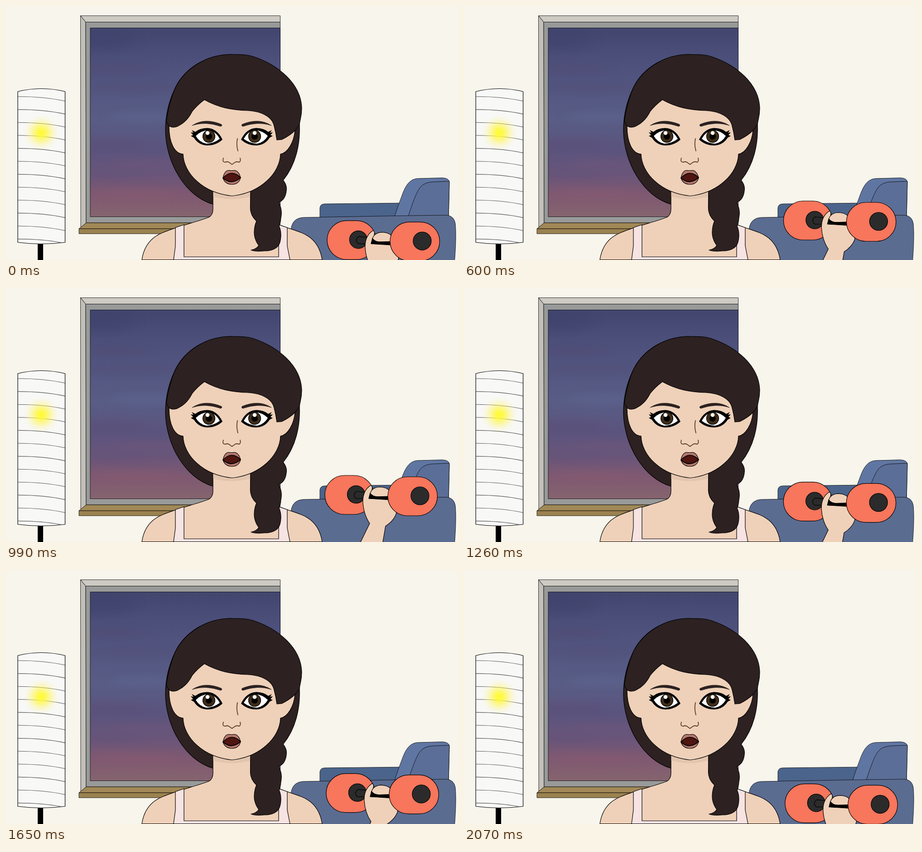
An HTML page that plays this animation: 998 by 561 pixels, repeating every 2100 ms.

```html
<!DOCTYPE html>
<html lang="en">
<head>
<meta charset="utf-8">
<title>Evening workout</title>
<style>
html, body { margin: 0; height: 100%; overflow: hidden; background: #f7f5ec; }
svg { display: block; width: 100vw; height: 100vh; }
.line { stroke: #000; stroke-width: 1.2; stroke-linejoin: round; }
.thin { stroke: #000; stroke-width: .8; stroke-linejoin: round; }
.skin { fill: #efd1b9; }
.hair { fill: #2d2121; }
</style>
</head>
<body>
<svg viewBox="0 0 998 561">
  <defs>
    <linearGradient id="sky" x1="0" y1="0" x2="0" y2="1">
      <stop offset="0" stop-color="#42466f"/>
      <stop offset=".2" stop-color="#4e517c"/>
      <stop offset=".48" stop-color="#595d86"/>
      <stop offset=".64" stop-color="#5a547e"/>
      <stop offset=".78" stop-color="#6a5579"/>
      <stop offset=".89" stop-color="#7f5971"/>
      <stop offset="1" stop-color="#86646e"/>
    </linearGradient>
    <radialGradient id="glow">
      <stop offset="0" stop-color="#fffb30"/>
      <stop offset=".2" stop-color="#fffa3c" stop-opacity=".9"/>
      <stop offset=".5" stop-color="#fff650" stop-opacity=".5"/>
      <stop offset=".75" stop-color="#fff36a" stop-opacity=".18"/>
      <stop offset="1" stop-color="#fff36a" stop-opacity="0"/>
    </radialGradient>
    <filter id="soft" x="-50%" y="-100%" width="200%" height="300%"><feGaussianBlur stdDeviation="16 7"/></filter>
    <clipPath id="glass"><rect x="186" y="48.500" width="419" height="417"/></clipPath>
  </defs>

  <!-- window -->
  <g class="thin">
    <path fill="#cdcac3" d="M164.500 21.500H605.500V35.500H176Z"/>
    <path fill="#c2bfb9" d="M164.500 21.500L176 35.500L177 479L165 490Z"/>
    <path fill="#989a99" d="M176 35.500H605.500V479H177Z"/>
    <path fill="#a18856" d="M177 479H605V492H161Z"/>
    <path fill="#9b8250" d="M161 492H605V503H161Z"/>
    <rect x="186" y="48.500" width="419.500" height="417" fill="url(#sky)"/>
  </g>
  <g clip-path="url(#glass)"><g filter="url(#soft)" opacity=".26">
    <ellipse cx="210" cy="75" rx="70" ry="25" fill="#383c66"/>
    <ellipse cx="235" cy="140" rx="80" ry="10" fill="#58446a"/>
    <ellipse cx="280" cy="180" rx="100" ry="9" fill="#58486f"/>
    <ellipse cx="310" cy="245" rx="80" ry="14" fill="#5f6c97"/>
    <ellipse cx="215" cy="305" rx="100" ry="14" fill="#604a72"/>
    <ellipse cx="320" cy="348" rx="90" ry="8" fill="#80597a"/>
    <ellipse cx="225" cy="372" rx="70" ry="8" fill="#5b4f78"/>
    <ellipse cx="290" cy="412" rx="110" ry="9" fill="#955b6d"/>
  </g></g>

  <!-- lamp -->
  <path d="M70 520H82V561H70Z"/>
  <path class="line" fill="#f8f8f7" d="M26 189Q78 176 130.500 189V522Q78 529 26 522Z"/>
  <g id="ribs" fill="none" stroke="#555" stroke-width="1.1"></g>
  <circle cx="78" cy="280" r="40" fill="url(#glow)"/>

  <!-- armchair -->
  <g class="thin">
    <path fill="#4b648b" d="M693 470V446Q694 437 704 437L890 435V470Z"/>
    <path fill="#6076a2" d="M857 468Q866 440 873 422C880 402 888 383 908 381L963 379.500Q979 380 979 390L977 470Z"/>
    <path fill="#5b6e97" d="M887 468C896 440 906 410 915 400Q924 389 943 388.500L979 387L977 470Z"/>
    <path fill="#5b6c91" d="M628 570L630 488Q635 468 656 467L890 463L972 462Q989 463 992 480Q995 510 990 570Z"/>
  </g>

  <!-- arm and dumbbell -->
  <g id="arm" class="line">
    <rect x="704" y="414" width="108" height="86" rx="43" fill="#f7765c"/>
    <circle cx="773" cy="456" r="19.500" fill="#2b2b2b"/>
    <path fill="#2b2b2b" d="M774 449L792 451L848 459V468L792 465H773Q764 457 774 449Z"/>
    <path class="skin" d="M805 436Q810 437 808 446Q804 457 802 465L848 468Q866 480 861 500Q855 515 838 526L832 561L820 640H745L783 561L803 520Q790 501 788 474Q787 448 805 436Z"/>
    <path class="skin" d="M804 454Q808 440 826 439.500Q840 440 847 448V461H820Q810 461 804 454Z"/>
    <path d="M804 453Q810 461 820 461L847 460V467L801 465Z"/>
    <rect x="843" y="417" width="109.500" height="86" rx="43" fill="#f7765c"/>
    <circle cx="914" cy="459" r="20" fill="#2b2b2b"/>
  </g>

  <!-- hair behind, body -->
  <g class="line">
    <path class="hair" d="M500 107C440 106 395 140 375 178C358 212 352 245 352 275C353 345 395 420 457 438L480 400L612 385C640 350 650 305 648 262L640 200Z"/>
    <path class="skin" d="M457 395V445Q458 462 447 467C415 479 380 486 345 501C318 512 304 534 300 560.500H698C694 534 680 512 653 501C635 494 615 488 603 483L540 450V395Z"/>
    <path fill="#e3c5ae" stroke="none" d="M457.600 408H540V421Q500 432 457.600 421Z"/>
    <path fill="#f6e3e2" d="M374 489.500L393 483V554H602V483L621 489.500V530L627 560.500H370L374 530Z"/>
    <path class="hair" d="M612 385Q621 396 619 408Q617 428 602 434Q611 450 607 468Q606 480 603 486Q609 500 606 517C604 531 595 541 570 541Q550 543 541 539Q553 537 558 529Q548 515 548 500Q548 487 553 475Q539 462 539.500 445L540 395L560 360"/>
  </g>

  <!-- face -->
  <g class="line">
    <path class="skin" d="M360 265C360 302 372 326 391 327C392 369 434 413 499 419.500C562 413 605 369 606 327C622 325 636 300 638 275L600 180H420Z"/>
    <path class="hair" d="M500 107C440 106 395 140 375 178C365 200 357 230 354 255L360 265Q370 271 382 264Q400 255 411 233Q422 219 438 207C470 225 500 230 535 231C565 233 588 245 592 265Q596 280 598 296L609 295Q627 286 638 275L648 262C649 250 653 245 653 225C651 170 599 130 550 113C535 107 520 107 500 107Z"/>
  </g>
  <g id="eye">
    <path d="M478 295Q466 270 444 269.500Q427 270 418 278L410 274L414 280L408 279L413 285L408 287L415 291Q425 307 444 308Q464 308 478 295Z"/>
    <path fill="#fff" d="M419 287Q431 275 446 274.500Q463 276 472 293.500Q457 304.500 442 304Q427 301 419 287Z"/>
    <circle class="line" cx="448" cy="288" r="13.500" fill="#3f2d19"/>
    <circle cx="448" cy="288" r="7"/>
    <path class="hair" stroke="#000" stroke-width=".6" d="M411 264Q438 246 475 261Q479 264 474 266Q440 254 411 264Z"/>
  </g>
  <use href="#eye" transform="matrix(-1 0 0 1 997 0)"/>
  <g fill="#fff">
    <circle cx="445" cy="280.500" r="4.300"/>
    <circle cx="549" cy="280.500" r="4.300"/>
  </g>
  <g fill="none" stroke="#5a3c2b" stroke-width="1.800" stroke-linecap="round">
    <path d="M511 293Q508 306 512 320"/>
    <path d="M480 336Q477 345 484 345Q488 343 492 345L499 350L506 345Q511 343 514 345Q519 344 517 336"/>
  </g>
  <path class="line" fill="#b5786e" d="M479 380Q482 364 491 363Q498 364 505 363Q514 364 518 379Q515 394 498 394Q483 393 479 380Z"/>
  <path fill="#4f1511" stroke="#000" stroke-width="1.700" d="M479 380Q498 359 518 379Q498 397 479 380Z"/>
</svg>
<script>
const ribs = document.getElementById('ribs'), arm = document.getElementById('arm');
const LOOP = 2100, TOP = 900, STEP = 30;

let d = '';
for (let i = 0; i < 12; i++) {
  const y = 200 + i * 28.6;
  d += i < 11 ? `M26 ${y}Q85 ${y} 130 ${y + 10}` : `M26 ${y}Q80 ${y} 122 ${y + 8}`;
}
ribs.innerHTML = `<path d="${d}"/>`;

// Steady lift, slower steady lowering
function draw(now) {
  const t = Math.floor(now % LOOP / STEP) * STEP;
  const lift = t < TOP ? t / TOP : (LOOP - t) / (LOOP - TOP);
  const drop = 0.925 - lift;
  arm.setAttribute('transform', `translate(${5.4 * drop} ${64.9 * drop})`);
}

const start = performance.now();
function loop() {
  draw(performance.now() - start);
  requestAnimationFrame(loop);
}
loop();
</script>
</body>
</html>
```
